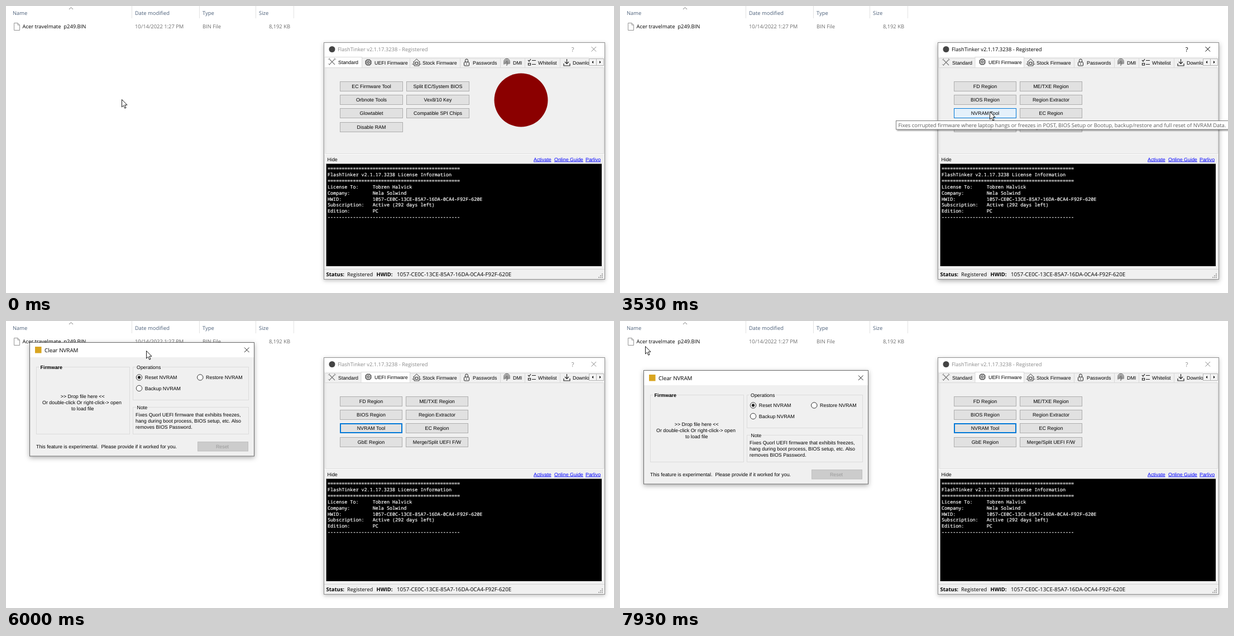
Recreate the animation shown at these times as an HTML page. Size 1089 px wide and 514 px high, loop 8 s.

```html
<!DOCTYPE html>
<html lang="en">
<head>
<meta charset="utf-8">
<title>NVRAM tool walkthrough</title>
<style>
  html, body { margin: 0; width: 100%; height: 100%; overflow: hidden; background: #fff; }
  svg { display: block; }
  text { white-space: pre; text-rendering: geometricPrecision; font: 8.9px "Liberation Sans", Arial, sans-serif; }
  .ui { font: 9.4px "Open Sans", "Noto Sans", sans-serif; }
  .mono { font: 8.42px "Noto Sans Mono", "DejaVu Sans Mono", monospace; fill: #fff; stroke: #fff; stroke-width: .2px; }
  .mid { text-anchor: middle; }
  .bold { font-weight: bold; }
  .head { fill: #4c607a; }
  .dim { fill: #6d6d6d; }
  .link { fill: #00f; text-decoration: underline; }
  .line { fill: none; stroke: #222; }
  .group { fill: none; stroke: #dcdcdc; }
  .button { fill: #e1e1e1; stroke: #adadad; }
  .hover { fill: #e5f1fb; stroke: #0078d7; }
  .pressed { fill: #cce4f7; stroke: #005499; }
  .focused { stroke: #0078d7; }
</style>
</head>
<body>
<svg id="stage" width="1089" height="514" viewBox="0 0 1089 514">
  <defs>
    <filter id="soft" x="-10%" y="-10%" width="120%" height="125%">
      <feDropShadow dx="0" dy="2" stdDeviation="3.5" flood-opacity=".25"/>
    </filter>
    <filter id="deep" x="-10%" y="-10%" width="120%" height="125%">
      <feDropShadow dx="0" dy="2.5" stdDeviation="4.5" flood-opacity=".32"/>
    </filter>
    <filter id="tipShadow" x="-2%" y="-20%" width="104%" height="160%">
      <feDropShadow dx="2" dy="2" stdDeviation=".8" flood-opacity=".4"/>
    </filter>
    <clipPath id="tabClip"><rect x="571" y="90" width="473" height="21"/></clipPath>
  </defs>
</svg>
<script>
const LOOP = 8000, FPS = 15;
const stage = document.getElementById('stage');

const text = (x, y, s, cls = '', more = '') => `<text x="${x}" y="${y}" class="${cls}" ${more}>${s}</text>`;
const rect = (x, y, w, h, fill, more = '') => `<rect x="${x}" y="${y}" width="${w}" height="${h}" fill="${fill}" ${more}/>`;
const path = (d, cls = 'line', more = '') => `<path d="${d}" class="${cls}" ${more}/>`;
const group = (id, content, more = '') => `<g id="${id}" ${more}>${content}</g>`;
const box = (x, y, w, h, cls, more = '') => `<rect x="${x}" y="${y}" width="${w}" height="${h}" class="${cls}" ${more}/>`;

const ROWS = [135.5, 159.5, 183.5, 208.5];
const BUTTON = { w: 112, h: 17 };
const button = (label, col, row, page) => {
  const x = col ? 717.5 - (page === 'uefi') : 598.5;
  const w = BUTTON.w - (page === 'uefi');
  return box(x, ROWS[row], w, BUTTON.h, 'button', `id="${page}${col}${row}"`) +
    text(x + w / 2, ROWS[row] + 11.5, label, 'mid');
};
const buttons = (page, columns) =>
  columns.map((labels, col) => labels.map((label, row) => button(label, col, row, page)).join('')).join('');

const explorer = () =>
  path('M225.5 0V22M346.5 0V22M447.5 0V22M515.5 0V22', '', 'stroke="#e3e3e3"') +
  path('M113 6L116.5 2.5L120 6', '', 'fill="none" stroke="#777"') +
  [['Name', 12], ['Date modified', 231], ['Type', 352], ['Size', 453]].map(([s, x]) => text(x, 16, s, 'ui head')).join('') +
  path('M14.5 30.5H21L24.5 34V43.5H14.5ZM21 30.5V34H24.5', '', 'fill="#fff" stroke="#8a8a8a" stroke-width=".9"') +
  text(29.5, 40.3, 'Acer travelmate  p249.BIN', 'ui') +
  text(231, 40.3, '10/14/2022 1:27 PM', 'ui dim') +
  text(352, 40.3, 'BIN File', 'ui dim') +
  text(509, 40.3, '8,192 KB', 'ui dim', 'text-anchor="end"');

// Each tab: label, left, right, label x, icon
const TABS = [
  ['Standard', 571, 637, 595,
    path('M579 96L589 106M589 96L579 106', '', 'stroke="#777" stroke-width="1.1"') +
    path('M577 97L580 94M588 94L591 97M577 104L580 107', '', 'stroke="#777" stroke-width=".8"')],
  ['UEFI Firmware', 637, 723, 660,
    box(645, 97, 8, 8, 'line', 'rx="1" stroke-width="1.1"') + box(647.5, 99.5, 3, 3, 'line', 'stroke-width=".9"') +
    path('M647 95V97M649 95V97M651 95V97M647 105V107M649 105V107M651 105V107M643 99H645M643 101H645M643 103H645M653 99H655M653 101H655M653 103H655', 'line', 'stroke-width=".7"')],
  ['Stock Firmware', 723, 813, 746,
    path('M729 101L735.5 95L742 101M731 100V107H740V100M727.5 104H731M740 104H743.5', 'line', 'stroke-width=".9"') +
    box(733.5, 100.5, 4, 4, 'line', 'stroke-width=".9"')],
  ['Passwords', 813, 885, 836,
    box(820.5, 100.5, 9, 6.5, 'line', 'rx="1"') + path('M822.5 100V97.5A2.5 2.5 0 0 1 827.5 97.5V100M825 102.5V105')],
  ['DMI', 885, 929, 908,
    [1.5, 3.3, 5.1].map(r => path(`M${897 - r} ${103 + r / 3}V${100 - r / 8}A${r} ${r} 0 0 1 ${897 + r} ${100 - r / 8}V${105 - r / 4}`, 'line', 'stroke-width=".8"')).join('') +
    path('M897 99V107', 'line', 'stroke-width=".8"')],
  ['Whitelist', 929, 992, 953,
    path('M935 97L937 99L940 95M942 97.5H949M935.5 102.5H939.5V106H935.5ZM942 104.5H949', 'line', 'stroke-width="1.2"')],
  ['Download', 992, 1064, 1015,
    path('M1004.5 95V103M1001 100L1004.5 103.5L1008 100M999 103V107H1010V103', 'line', 'stroke-width="1.2"')]
];
const tab = ([label, left, right, x, icon], i, selected) => {
  const y = selected ? 91.5 : 93.5, edge = selected ? 1.5 : 0;
  return rect(left + .5 - edge, y, right - left + edge, 110.5 - y, selected ? '#fff' : '#f0f0f0', `stroke="#d9d9d9" ${selected ? '' : `id="tab${i}"`}`) +
    `<g transform="translate(0 ${selected ? -1 : 0})">${icon}${text(x, 104.7, label)}</g>`;
};
const tabStrip = chosen => {
  const order = TABS.map((_, i) => i).filter(i => i !== chosen).concat(chosen);
  return `<g clip-path="url(#tabClip)">${order.map(i => tab(TABS[i], i, i === chosen)).join('')}</g>`;
};

const HWID = '1057-CE0C-13CE-85A7-16DA-0CA4-F92F-620E';
const field = (name, value) => name.padEnd(16) + value;
const consoleLines = [
  '='.repeat(47),
  'FlashTinker v2.1.17.3238 License Information',
  '='.repeat(47),
  field('License To:', 'Tobren Halvick'),
  field('Company:', 'Nela Solwind'),
  field('HWID:', HWID),
  field('Subscription:', 'Active (292 days left)'),
  field('Edition:', 'PC'),
  '-'.repeat(47)
];

const mainWindow = () =>
  rect(569.5, 65.5, 503, 424, '#f0f0f0', 'id="mainFrame" stroke="#8f8f8f"') +
  rect(570, 66, 502, 25, '#fff') +
  '<circle cx="584" cy="77.5" r="5.5" fill="#444"/>' +
  group('mainTitle', text(594, 81.3, 'FlashTinker v2.1.17.3238 - Registered', 'ui') +
    text(1015, 81.5, '?', 'ui mid', 'style="font-size:11px"') +
    path('M1048.5 73L1057 81.5M1057 73L1048.5 81.5', '', 'stroke="currentColor"'), 'fill="currentColor"') +
  rect(570, 91, 502, 20, '#f3f3f3') +
  rect(572.5, 110.5, 498, 154, '#f0f0f0', 'stroke="#dcdcdc"') +
  group('stdPage', tabStrip(0) +
    buttons('std', [['EC Firmware Tool', 'Orbnote Tools', 'Glowtablet', 'Disable RAM'],
      ['Split EC/System BIOS', 'Vex8/10 Key', 'Compatible SPI Chips']]) +
    '<circle cx="922.5" cy="168.5" r="48" fill="#8b0000"/>') +
  group('uefiPage', tabStrip(1) +
    buttons('uefi', [['FD Region', 'BIOS Region', 'NVRAM Tool', 'GbE Region'],
      ['ME/TXE Region', 'Region Extractor', 'EC Region', 'Merge/Split UEFI F/W']])) +
  box(599.5, ROWS[2] + 1, BUTTON.w - 3, BUTTON.h - 2, 'focused', 'id="focusRing" fill="none"') +
  rect(1044.5, 94.5, 13, 12, '#f4f4f4', 'stroke="#b5b5b5"') +
  rect(1057.5, 94.5, 13, 12, '#f4f4f4', 'stroke="#b5b5b5"') +
  path('M1052 98V103L1049.5 100.5ZM1063 98V103L1065.5 100.5Z', '') +
  path('M570 265.5H1072', '', 'stroke="#fff"') +
  text(575.5, 277.5, 'Hide') +
  [['Activate', 945], ['Online Guide', 982], ['Parlivo', 1038]].map(([s, x]) => text(x, 277.5, s, 'link')).join('') +
  rect(574, 283, 493, 183, '#000') +
  path('M573.5 466V282.5H1067', '', 'fill="none" stroke="#8c8c8c"') +
  path('M573 466.5H1067.5V282', '', 'fill="none" stroke="#f8f8f8"') +
  consoleLines.map((s, i) => text(576, 294.2 + i * 10.88, s, 'mono')).join('') +
  path('M570 471.5H1072', '', 'stroke="#d7d7d7"') +
  text(573.5, 483.7, 'Status:', 'ui bold') + text(611, 483.7, 'Registered', 'ui') +
  text(663.5, 483.7, 'HWID:', 'ui bold') + text(700, 483.7, HWID, 'ui', 'style="font-size:9.8px"') +
  path('M1068 479v2M1068 482v2M1068 485v2M1065 482v2M1065 485v2M1062 485v2', '', 'stroke="#aaa" stroke-width="2"');

const frameBox = (x, y, w, h, label, labelX, cls = '') =>
  box(x + .5, y + .5, w, h, 'group') +
  rect(labelX - 1, y - 3, label.length * 4.6, 7, '#f0f0f0') +
  text(labelX, y + 3.7, label, cls);
const radio = (x, y, label, on) =>
  `<circle cx="${x}" cy="${y}" r="5.2" fill="#fff" stroke="#333"/>` +
  (on ? `<circle cx="${x}" cy="${y}" r="2.7" fill="#222"/>` : '') +
  text(x + 10.3, y + 3.3, label);
const lines = (x, y, list, cls) => list.map((s, i) => text(x, y + i * 10.9, s, cls)).join('');

const dialog = () =>
  rect(42.5, 14.5, 402, 203.5, '#f0f0f0', 'id="dialogFrame" stroke="#6a6a6a"') +
  rect(43, 15, 401, 26, '#fff') +
  rect(52, 22, 11.5, 11.5, '#d9a520') +
  text(69, 31.6, 'Clear NVRAM', 'ui', 'style="font-size:9.8px"') +
  path('M427 23.5L435.5 32M435.5 23.5L427 32') +
  frameBox(54, 58, 167, 120, 'Firmware', 61.5, 'bold') +
  lines(137.2, 114.3, ['&gt;&gt; Drop file here &lt;&lt;', 'Or double-click Or right-click-&gt; open ', 'to load file'], 'mid') +
  frameBox(227, 58, 207, 59, 'Operations', 234) +
  radio(238.5, 77, 'Reset NVRAM', true) + radio(347.8, 77, 'Restore NVRAM') + radio(238.5, 96.5, 'Backup NVRAM') +
  frameBox(227, 130, 207, 48, 'Note', 234.5) +
  lines(232, 147.2, ['Fixes Quorl UEFI firmware that exhibits freezes,', 'hang during boot process, BIOS setup, etc. Also', 'removes BIOS Password.']) +
  text(54, 204.2, 'This feature is experimental.  Please provide if it worked for you.') +
  rect(343.5, 192.5, 90, 16.5, '#ccc', 'stroke="#bfbfbf"') +
  text(387.5, 204.2, 'Reset', 'mid', 'fill="#9a9a9a"');

const tooltip = () =>
  rect(494.5, 205.5, 610, 15.5, '#fff', 'stroke="#767676" filter="url(#tipShadow)"') +
  text(498.5, 216.6, 'Fixes corrupted firmware where laptop hangs or freezes in POST, BIOS Setup or Bootup, backup/restore and full reset of NVRAM Data.', 'ui', 'fill="#575757" style="font-size:9.45px"');

stage.insertAdjacentHTML('beforeend',
  explorer() + group('main', mainWindow()) + group('dialog', dialog()) + group('tooltip', tooltip()) +
  group('cursor', path('M.5 .5V14L3.6 11.1L5.8 16.2L8 15.2L5.8 10.2H10Z', '', 'fill="#fff" stroke="#000" stroke-width=".9"')));

const el = id => document.getElementById(id);
const show = (id, on) => el(id).setAttribute('visibility', on ? 'visible' : 'hidden');

// Keys: time, then one or more values
const CURSOR = [
  [733, 207, 167], [933, 330, 135], [1200, 610, 88], [1333, 716, 81], [1533, 700, 99],
  [2467, 700, 99], [2667, 692, 128], [2933, 662, 192], [3000, 662, 192], [3200, 662, 189],
  [3600, 662, 189], [3867, 662, 187], [4600, 662, 187], [4800, 600, 168], [5067, 400, 100],
  [5333, 270, 57], [5467, 252, 31], [5600, 251, 25], [5800, 251, 25], [6200, 251, 80],
  [6467, 251, 95], [6667, 251, 97], [7333, 251, 97], [7533, 190, 84], [7933, 45, 45]
];
const DRAG = [[5800, 0], [6200, 48], [6467, 70], [6667, 74]];
const FADE = [[3333, 0], [3533, .95], [3867, 1]];

function track(keys, t) {
  const next = keys.findIndex(k => k[0] > t);
  if (next === 0) return keys[0].slice(1);
  if (next < 0) return keys[keys.length - 1].slice(1);
  const a = keys[next - 1], b = keys[next], p = (t - a[0]) / (b[0] - a[0]);
  return a.slice(1).map((v, i) => v + (b[i + 1] - v) * p);
}

function buttonState(row, x, y, t) {
  const inside = x >= 598 && x < 710 && y >= ROWS[row] && y < ROWS[row] + BUTTON.h;
  if (row === 2 && t >= 4330 && t < 4530) return 'button pressed';
  return 'button' + (inside ? ' hover' : '') + (row === 2 && t >= 4530 ? ' focused' : '');
}

function draw(time) {
  const t = Math.floor((time % LOOP + 5) * FPS / 1000) * 1000 / FPS + 4;
  const [x, y] = track(CURSOR, t).map(Math.round);
  const uefi = t >= 1870, opened = t >= 4530, active = uefi && !opened;

  el('cursor').setAttribute('transform', `translate(${x} ${y})`);
  show('stdPage', !uefi);
  show('uefiPage', uefi);
  el('mainTitle').style.color = active ? '#000' : '#8a8a8a';
  el('mainFrame').setAttribute('filter', active ? 'url(#deep)' : 'url(#soft)');

  const overTab = !uefi && x >= 637 && x < 723 && y >= 93 && y < 110;
  el('stdPage').querySelector('#tab1').setAttribute('fill', overTab ? '#d8eaf9' : '#f0f0f0');
  ROWS.forEach((_, row) => el('uefi0' + row).setAttribute('class', buttonState(row, x, y, t)));
  show('focusRing', opened);

  show('tooltip', t >= 3400 && t < 4330);
  el('tooltip').setAttribute('opacity', track(FADE, t)[0]);

  show('dialog', opened);
  el('dialog').setAttribute('transform', `translate(0 ${Math.round(track(DRAG, t)[0])})`);
  el('dialogFrame').setAttribute('filter', t >= 4670 ? 'url(#deep)' : 'url(#soft)');
}

const start = performance.now();
function tick() {
  draw(performance.now() - start);
  requestAnimationFrame(tick);
}
tick();
</script>
</body>
</html>
```
